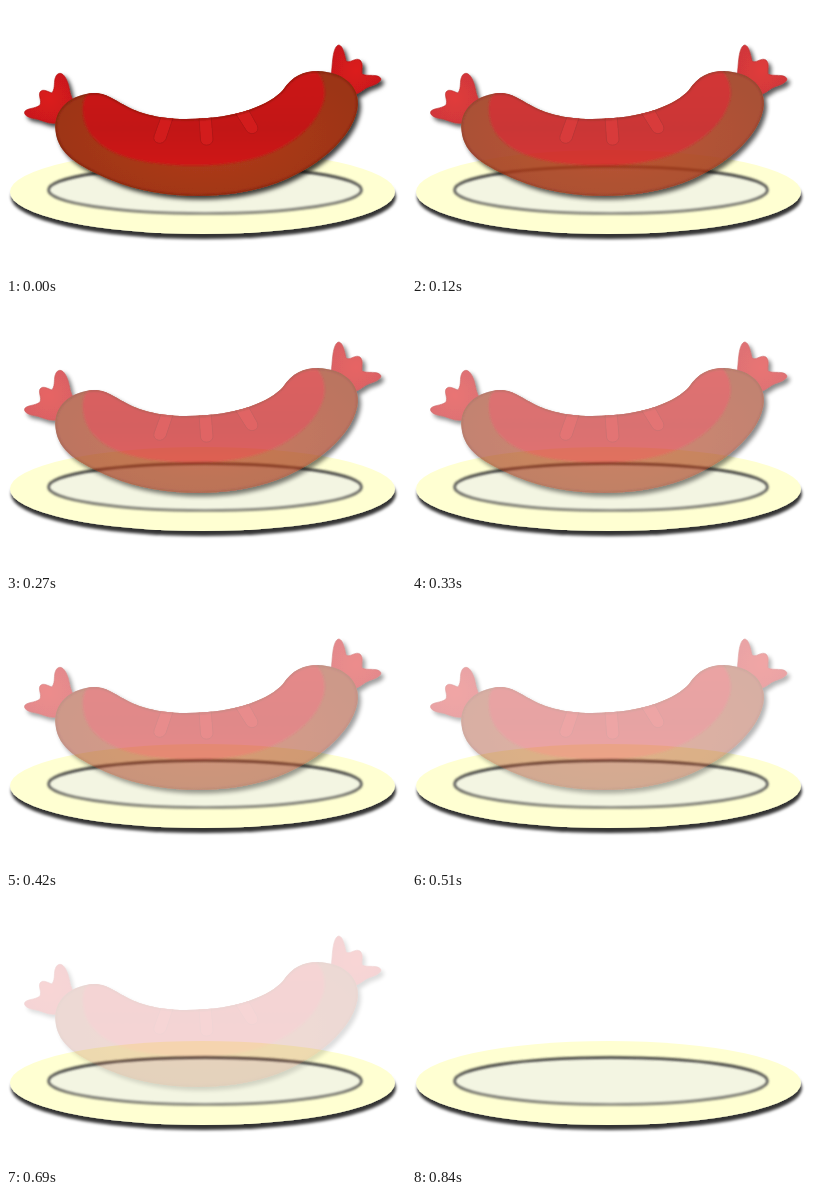
An HTML page for the animation above (870 ms loop, 400 by 269 pixels).

```html
<!DOCTYPE html>
<html lang="en">
<head>
<meta charset="utf-8">
<title>Fading sausage</title>
<style>
  html, body { margin: 0; width: 100%; height: 100%; overflow: hidden; background: #fff; }
  svg { display: block; width: 100%; height: 100%; }
</style>
</head>
<body>
<svg viewBox="0 0 400 269">
  <defs>
    <filter id="plateShadow" x="-10%" y="-20%" width="120%" height="150%">
      <feDropShadow dx="1" dy="5" stdDeviation="1.8" flood-color="#000" flood-opacity=".8"/>
    </filter>
    <filter id="sausageShadow" x="-10%" y="-10%" width="120%" height="125%">
      <feDropShadow dx="3" dy="3.5" stdDeviation="1.9" flood-color="#000" flood-opacity=".75"/>
    </filter>
    <filter id="soft" x="-10%" y="-20%" width="120%" height="140%">
      <feGaussianBlur stdDeviation="1.2"/>
    </filter>
    <linearGradient id="rim" x2="0" y2="1">
      <stop stop-color="#333"/>
      <stop offset="1" stop-color="#83837a"/>
    </linearGradient>
    <radialGradient id="skin" gradientUnits="userSpaceOnUse" cx="200" cy="130" r="160" gradientTransform="matrix(1 0 0 .5 0 65)">
      <stop offset=".3" stop-color="#ac3a1a"/>
      <stop offset="1" stop-color="#9c3416"/>
    </radialGradient>
    <linearGradient id="flesh" gradientUnits="userSpaceOnUse" x1="0" y1="66" x2="0" y2="161">
      <stop stop-color="#cc1a17"/>
      <stop offset=".6" stop-color="#c21616"/>
      <stop offset="1" stop-color="#cf1612"/>
    </linearGradient>
    <radialGradient id="tail">
      <stop stop-color="#dc1b1b"/>
      <stop offset="1" stop-color="#cb191b"/>
    </radialGradient>
    <path id="body" d="M49.500 125C47 102 66 88 88 87C112 87 118 112.500 180 113C233 113 264 98 277 84C286 70 298 65 312 65C336 66 352 78 352 98C350 130 310 165 262 180C215 195 150 193 105 174C72 160 52 148 49.500 125Z"/>
    <clipPath id="inside"><use href="#body"/></clipPath>
  </defs>

  <ellipse cx="196.500" cy="186" rx="192.500" ry="42" fill="#ffffd2" filter="url(#plateShadow)"/>
  <ellipse cx="199" cy="184" rx="157" ry="23.500" fill="#f3f5e2"/>
  <ellipse cx="199" cy="184" rx="156.500" ry="23.500" fill="none" stroke="url(#rim)" stroke-width="2.600" filter="url(#soft)"/>

  <g id="sausage" filter="url(#sausageShadow)">
    <g fill="url(#tail)" stroke="#b01717" stroke-width=".6">
      <path d="M67 94C63 87 64 82 61 75C58 67 53 65 50 70C47 76 50 81 46 87C42 86 37 82 34 86C32 90 36 94 34 99C29 103 20 102 18.500 106C18 110 24 112 31 113C38 115 43 118 50 117C58 114 65 106 67 94Z"/>
      <path d="M325 70C326 64 326 58 327 51C328 44 330 39 333 39C337 40 338 47 340 55C344 58 349 51 354 54C358 58 355 63 356 68C361 71 373 67 375 73C374 78 366 79 360 82C353 87 348 90 342 89C334 86 326 79 325 70Z"/>
    </g>
    <use href="#body" fill="url(#skin)"/>
    <g clip-path="url(#inside)">
      <path d="M78 113C75 98 78 89 86 84L180 105L277 75L308 63C317 70 321 84 317 97C309 123 278 145 246 153C208 163 153 161 120 151C98 144 81 130 78 113Z" fill="url(#flesh)" filter="url(#soft)"/>
      <g fill="#d21d1c" stroke="#a91516" stroke-width=".8">
        <path d="M156 108L148 130C146 138 157 140 160 133L168 109"/>
        <path d="M193 111L194.500 134C195 141 207 141 207 133L205 109"/>
        <path d="M228 105L240 124C244 131 255 127 251 119L241 101"/>
      </g>
      <use href="#body" fill="none" stroke="#6e1d0c" stroke-opacity=".6" stroke-width="2.400" filter="url(#soft)"/>
    </g>
  </g>
</svg>
<script>
  const LOOP = 870, STEP = 30, LAST = LOOP / STEP - 1;
  const sausage = document.getElementById("sausage");
  const start = performance.now();

  function draw() {
    const step = Math.floor(((performance.now() - start) % LOOP) / STEP);
    sausage.style.opacity = 1 - step / LAST;
    requestAnimationFrame(draw);
  }
  draw();
</script>
</body>
</html>
```
